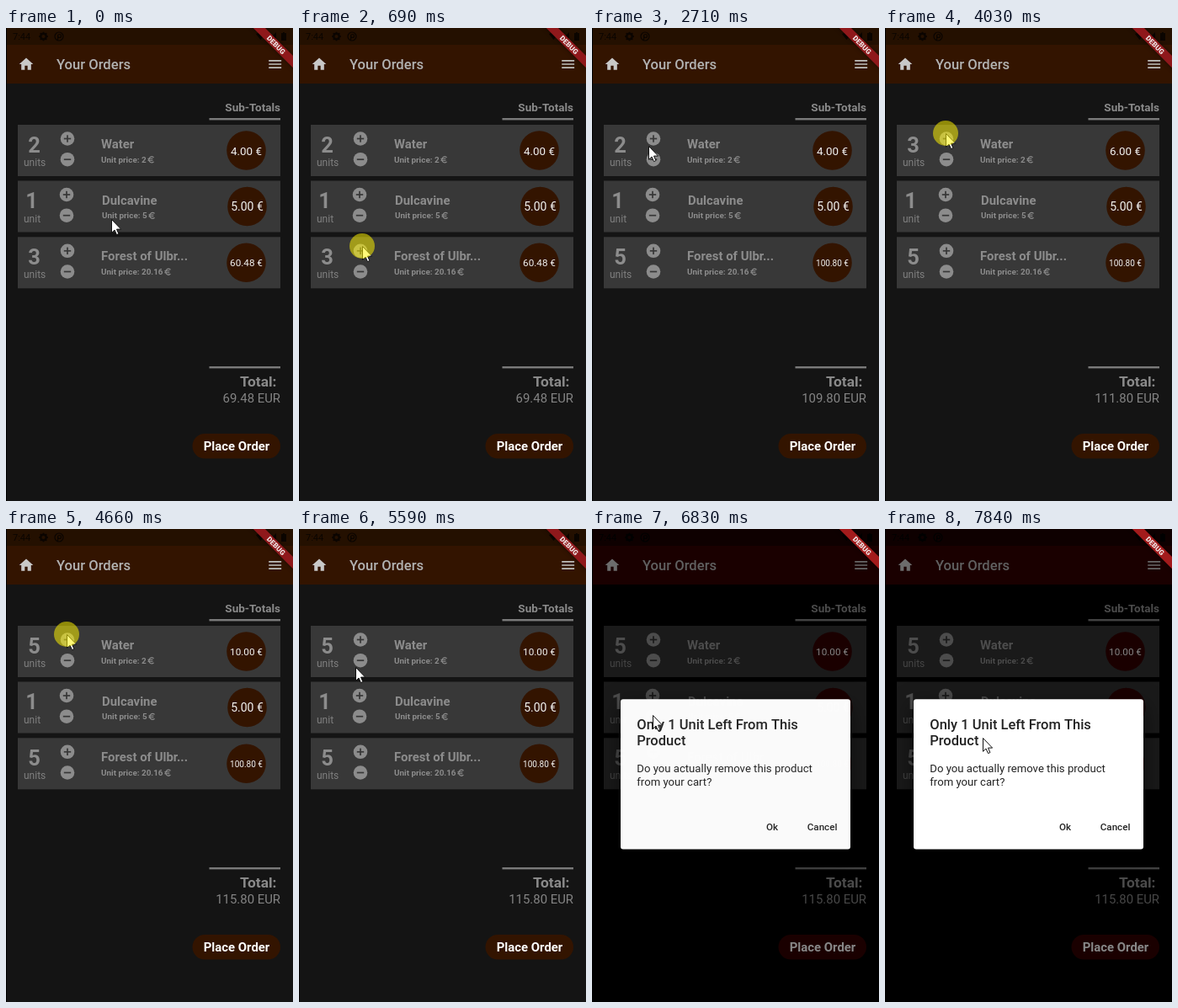
Recreate the animation shown at these times as an HTML page with a canvas. Size 341x562 px, loop 8000 ms.

```html
<!DOCTYPE html>
<html lang="en">
<head>
<meta charset="utf-8">
<title>Your Orders</title>
<style>
html, body { margin: 0; width: 100%; height: 100%; overflow: hidden; background: #141414; }
canvas { display: block; width: 341px; height: 562px; }
</style>
</head>
<body>
<canvas id="stage"></canvas>
<script>
const W = 341, H = 562, LOOP = 8000;
const canvas = document.getElementById('stage');
const ctx = canvas.getContext('2d');
const ratio = window.devicePixelRatio || 1;
canvas.width = W * ratio;
canvas.height = H * ratio;

const LIGHT = { bg: '#141414', status: '#241000', bar: '#331400', row: '#383838', ink: '#0b0500', banner: '#8f181b', text: 1 };
const DIMMED = { bg: '#000000', status: '#0e0000', bar: '#1a0000', row: '#1a1a1a', ink: '#000000', banner: '#a31b1c', text: 0.54 };

const ICON = 0.83;
const HOME = new Path2D('M10 20v-6h4v6h5v-8h3L12 3 2 12h3v8z');
const MENU = new Path2D('M3 18h18v-2H3zM3 13h18v-2H3zM3 6v2h18V6z');
const ARROW = new Path2D('M.5 .5V16.3L4 13 6.5 18.6 8.9 17.6 6.5 12.1H11.6Z');

// dx: second row is laid out around a narrower "unit" label
const ITEMS = [
  { name: 'Water', price: 2, shown: '2', y: 115, dx: 0, qty: 2 },
  { name: 'Dulcavine', price: 5, shown: '5', y: 181.5, dx: 1, qty: 1 },
  { name: 'Forest of Ulbr...', price: 20.16, shown: '20.16', y: 248.3, dx: 0, qty: 3 }
];

// press: ring on, quantity change, ring off
const PRESSES = [
  { on: 690, change: 770, off: 850, item: 2 },
  { on: 1630, change: 1700, off: 1780, item: 2 },
  { on: 3020, change: 3100, off: 3170, item: 0 },
  { on: 4030, change: 4110, off: 4190, item: 0 },
  { on: 4490, change: 4660, off: 4730, item: 0 },
  { on: 6600, off: 6680 }
];

// cursor moves along cubic curves, sampled in n steps
const MOVES = [
  { from: 80, to: 390, n: 5, x: [125, 112, 84, 75], y: [227, 234, 250, 255] },
  { from: 540, to: 540, n: 1, x: [75, 75, 75, 75], y: [255, 256, 258, 259] },
  { from: 2330, to: 2790, n: 7, x: [75, 64, 58, 72], y: [259, 230, 155, 125] },
  { from: 5440, to: 5970, n: 8, x: [72, 69, 58, 72], y: [125, 158, 200, 221] },
  { from: 7460, to: 7840, n: 6, x: [72, 47, 70, 116], y: [221, 226, 248, 248] }
];

const DIALOG_IN = 6830, DIALOG_FULL = 6910;

const cubic = ([a, b, c, d], p) => {
  const q = 1 - p;
  return a * q * q * q + 3 * b * q * q * p + 3 * c * q * p * p + d * p * p * p;
};

function cursorAt(t) {
  let move = MOVES[0], p = 0;
  for (const m of MOVES) {
    if (t < m.from) break;
    const gap = (m.to - m.from) / (m.n - 1) || 1;
    move = m;
    p = Math.min(m.n, Math.floor((t - m.from + 5) / gap) + 1) / m.n;
  }
  return [Math.round(cubic(move.x, p)), Math.round(cubic(move.y, p))];
}

function quantities(t) {
  const qty = ITEMS.map(i => i.qty);
  for (const p of PRESSES) if (t >= p.change) qty[p.item]++;
  return qty;
}

function text(str, x, y, size, weight, color, align = 'left') {
  ctx.font = `${weight} ${size}px Roboto, sans-serif`;
  ctx.textAlign = align;
  ctx.fillStyle = color;
  ctx.fillText(str, x, y);
}

function rect(x, y, w, h, color) {
  ctx.fillStyle = color;
  ctx.fillRect(x, y, w, h);
}

function disc(x, y, r, color) {
  ctx.fillStyle = color;
  ctx.beginPath();
  ctx.arc(x, y, r, 0, Math.PI * 2);
  ctx.fill();
}

function ring(x, y, r, width, color, start = 0, end = Math.PI * 2) {
  ctx.strokeStyle = color;
  ctx.lineWidth = width;
  ctx.beginPath();
  ctx.arc(x, y, r, start, end);
  ctx.stroke();
}

function roundBox(x, y, w, h, r, color) {
  ctx.fillStyle = color;
  ctx.beginPath();
  ctx.roundRect(x, y, w, h, r);
  ctx.fill();
}

function shape(points, color) {
  ctx.fillStyle = color;
  ctx.beginPath();
  points.forEach(([x, y]) => ctx.lineTo(x, y));
  ctx.fill();
}

function icon(path, cx, cy, color) {
  ctx.save();
  ctx.translate(cx - 12 * ICON, cy - 12 * ICON);
  ctx.scale(ICON, ICON);
  ctx.fillStyle = color;
  ctx.fill(path);
  ctx.restore();
}

function roundButton(x, y, plus, color, mark) {
  disc(x, y, 8.3, color);
  rect(x - 4.2, y - 0.85, 8.4, 1.7, mark);
  if (plus) rect(x - 0.85, y - 4.2, 1.7, 8.4, mark);
}

function euro(x, y, color) {
  ring(x + 0.6, y, 3.4, 1.1, color, 0.8, Math.PI * 2 - 0.8);
  rect(x - 4.2, y - 1.5, 6, 1, color);
  rect(x - 4.2, y + 0.5, 6, 1, color);
}

function statusBar(c) {
  rect(0, 0, W, 20, c.status);
  text('7:44', 8, 14, 11, 400, c.ink);
  ring(44.5, 10, 3.3, 2.4, c.ink);
  for (let i = 0; i < 8; i++) {
    const a = i * Math.PI / 4;
    disc(44.5 + Math.cos(a) * 4.6, 10 + Math.sin(a) * 4.6, 0.9, c.ink);
  }
  ring(63, 10, 5, 1.2, c.ink);
  ring(63.5, 9.5, 2, 1.2, c.ink);
  rect(61, 9, 1.2, 5, c.ink);
  shape([[297, 7], [302.5, 5], [308, 7], [302.5, 14]], c.ink);
  shape([[312, 14], [321, 14], [321, 5]], c.ink);
  rect(327, 6, 6, 9, c.ink);
  rect(329, 5, 2, 1, c.ink);
}

function banner(c) {
  ctx.save();
  ctx.translate(W, 0);
  ctx.rotate(Math.PI / 4);
  ctx.shadowColor = 'rgba(0,0,0,.5)';
  ctx.shadowBlur = 5 * ratio;
  rect(-40, 23.4, 80, 10, c.banner);
  ctx.shadowColor = 'transparent';
  text('DEBUG', 0, 31.4, 8.5, 900, '#f0e6e6', 'center');
  ctx.restore();
}

function row(item, qty, c, grey) {
  const { y, dx } = item;
  const soft = grey(140);
  const label = qty > 1 ? 'units' : 'unit';
  rect(14, y, 312, 61, c.row);
  text(qty, 33.5 - dx * 3, y + 32.5, 25.5, 700, soft, 'center');
  text(label, 21, y + 49, 12, 400, grey(128));
  roundButton(73 - dx, y + 16.5, true, soft, c.row);
  roundButton(73 - dx, y + 41.2, false, soft, c.row);
  text(item.name, 113 + dx, y + 28, 14.9, 700, soft);
  const info = 'Unit price: ' + item.shown;
  text(info, 113 + dx, y + 44.7, 9.9, 700, soft);
  euro(113 + dx + ctx.measureText(info).width + 6, y + 41.4, soft);

  disc(285.5 + dx, y + 30.5, 23.3, c.bar);
  const sum = (qty * item.price).toFixed(2) + ' €';
  const size = { 6: 13.4 + dx * 0.6, 7: 11.7, 8: 10.05 }[sum.length];
  text(sum, 285.5 + dx, y + 30.8 + size * 0.355, size, 400, grey(242), 'center');
}

function page(c, qty) {
  const grey = v => {
    const g = Math.round(v * c.text);
    return `rgb(${g},${g},${g})`;
  };
  rect(0, 0, W, H, c.bg);
  rect(0, 20, W, 46, c.bar);
  statusBar(c);
  icon(HOME, 24, 43, grey(200));
  text('Your Orders', 60, 49, 16.6, 500, grey(178));
  icon(MENU, 319.7, 43, grey(190));

  text('Sub-Totals', 326, 98.5, 13.5, 700, grey(138), 'right');
  rect(241.5, 107, 84.5, 2.4, grey(122));
  ITEMS.forEach((item, i) => row(item, qty[i], c, grey));

  const total = ITEMS.reduce((sum, item, i) => sum + item.price * qty[i], 0);
  rect(241.5, 402, 84.5, 2.4, grey(122));
  text('Total:', 321.5, 426, 17.4, 700, grey(138), 'right');
  text(total.toFixed(2) + ' EUR', 326, 445, 14.9, 400, grey(132), 'right');

  roundBox(221.5, 482, 104.5, 29.5, 14.75, c.bar);
  text('Place Order', 274, 502, 14.9, 700, grey(250), 'center');
  banner(c);
  rect(0, 0, 1, H, '#000');
}

function dialog(alpha) {
  const ink = '#222';
  ctx.save();
  ctx.globalAlpha = alpha;
  ctx.shadowColor = 'rgba(0,0,0,.6)';
  ctx.shadowBlur = 26 * ratio;
  ctx.shadowOffsetY = 8 * ratio;
  roundBox(34, 202.3, 273, 178.2, 3, '#fff');
  ctx.shadowColor = 'transparent';
  text('Only 1 Unit Left From This', 53.3, 237.8, 16.5, 500, ink);
  text('Product', 53.3, 256.8, 16.5, 500, ink);
  text('Do you actually remove this product', 53.3, 289, 13.15, 400, ink);
  text('from your cart?', 53.3, 304.5, 13.15, 400, ink);
  text('Ok', 207, 358, 11.6, 500, ink);
  text('Cancel', 255.8, 358, 11.6, 500, ink);
  ctx.restore();
}

function cursor(x, y, pressed) {
  ctx.save();
  ctx.translate(x, y);
  ctx.fillStyle = '#fff';
  ctx.fill(ARROW);
  ctx.strokeStyle = '#111';
  ctx.lineWidth = 1;
  ctx.stroke(ARROW);
  ctx.restore();
  if (pressed) disc(x, y, 15, 'rgba(255,243,0,.53)');
}

function draw(t) {
  const open = t >= DIALOG_IN;
  ctx.setTransform(ratio, 0, 0, ratio, 0, 0);
  page(open ? DIMMED : LIGHT, quantities(t));
  if (open) dialog(t < DIALOG_FULL ? 0.98 : 1);
  cursor(...cursorAt(t), PRESSES.some(p => t >= p.on && t < p.off));
}

const start = performance.now();
function tick() {
  draw((performance.now() - start) % LOOP);
  requestAnimationFrame(tick);
}
tick();
</script>
</body>
</html>
```
